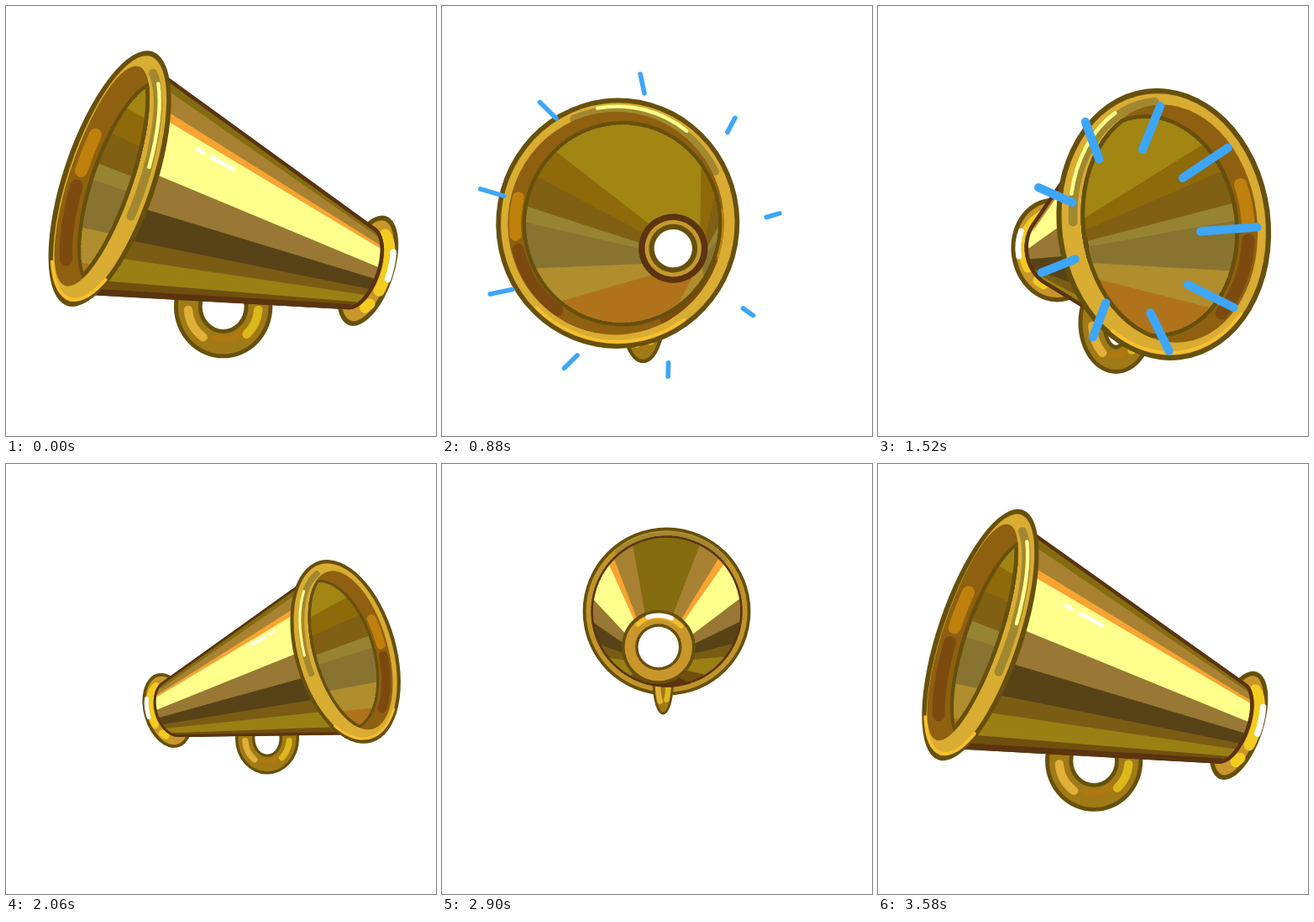
Recreate the animation shown at these times as an HTML page with a canvas. Size 512 px wide and 512 px high, loop 3.6 s.

```html
<!DOCTYPE html>
<html lang="en">
<head>
<meta charset="utf-8">
<title>Golden megaphone</title>
<style>
html, body { margin: 0; height: 100%; overflow: hidden; background: #fff; }
canvas { display: block; width: 512px; height: 512px; }
</style>
</head>
<body>
<canvas id="stage" width="512" height="512"></canvas>
<script>
const ctx = document.getElementById('stage').getContext('2d');
const LOOP = 3600, DEG = Math.PI / 180;
const OUTLINE = '#66500c', EDGE = '#5b3410', GOLD = '#d9ac32', BLUE = '#3ea6f8';

// time, bell x, y, radius, yaw, tilt, mouthpiece x, y, radius
const POSES = [
  [0, 123.5, 205.5, 159.5, -69.8, 18.6, 430.5, 315, 68.5],
  [80, 125, 211, 159.5, -70.2, 18.6, 431, 319, 68.5],
  [300, 93, 228, 145, -55, 16, 383, 306, 60],
  [520, 133.5, 247.5, 129.6, -38, 12, 317, 293.5, 50.5],
  [860, 205, 258, 148, -15, 5, 280, 290, 60],
  [1200, 273, 270, 166.5, 7, 0, 241, 285, 70],
  [1520, 340, 260, 162.5, 38.4, -7.4, 211, 290.5, 62],
  [1680, 383, 242, 169, 43, -10, 215, 300, 63],
  [2060, 404, 223.5, 112.6, 57.5, -16, 192.5, 293.5, 45.7],
  [2260, 462, 208, 106, 84, -17, 206, 284, 42],
  [2580, 390, 170, 100, 135, -12, 222, 240, 42],
  [2900, 268, 175.5, 100, 182, 0, 257.5, 218, 44],
  [3240, 95, 165, 106, 260, 18, 400, 238, 46]
];

// colour bands by angle from the top, mirrored left and right
const OUTSIDE = [
  [27, '#846c10'], [45, '#a88232'], [52, '#f8a432'], [82, '#ffff8c'], [98, '#987834'],
  [118, '#574317'], [130, '#7a5c14'], [150, '#9a8014'], [165, '#70500f'], [181, EDGE]
];
const INSIDE = [
  [48, '#a28614'], [67, '#8f6a0a'], [83, '#806014'], [92, '#978433'],
  [121, '#887430'], [143, '#b08e2e'], [181, '#b0731c']
];

const BURST = { start: 455, length: 240, rays: [10, 9, 8, 8, 9], turn: [9, 0, 0, 0, 16] };

function pose(i) {
  const n = POSES.length, turn = Math.floor(i / n);
  const p = POSES[i - turn * n].slice();
  p[0] += turn * LOOP;
  p[4] += turn * 360;
  return p;
}

// smooth cyclic curve through the poses
function poseAt(t) {
  let i = POSES.length - 1;
  while (POSES[i][0] > t) i--;
  const [a, b, c, d] = [-1, 0, 1, 2].map(o => pose(i + o));
  const h = c[0] - b[0], u = (t - b[0]) / h, u2 = u * u, u3 = u2 * u;
  return b.map((v, j) => {
    const m0 = (c[j] - a[j]) / (c[0] - a[0]) * h;
    const m1 = (d[j] - b[j]) / (d[0] - b[0]) * h;
    return (2 * u3 - 3 * u2 + 1) * v + (u3 - 2 * u2 + u) * m0 +
      (3 * u2 - 2 * u3) * c[j] + (u3 - u2) * m1;
  });
}

const lerp = (a, b, f) => a + (b - a) * f;
const mix = (a, b, f) => ({ x: lerp(a.x, b.x, f), y: lerp(a.y, b.y, f) });

// a round section seen at an angle
function disc(c, r, k, tilt) {
  return { x: c.x, y: c.y, r, k, tilt };
}

function halfway(d, e) {
  const r = (d.r + e.r) / 2;
  return disc(mix(d, e, 0.5), r, (d.r * d.k + e.r * e.k) / 2 / r, d.tilt);
}

function onDisc(d, deg) {
  const s = Math.sin(deg * DEG) * d.k, u = Math.cos(deg * DEG);
  const cs = Math.cos(d.tilt), sn = Math.sin(d.tilt);
  return { x: d.x + d.r * (s * cs + u * sn), y: d.y + d.r * (s * sn - u * cs) };
}

function oval(d, scale, inset = 0, from = 0, to = 360) {
  const r = Math.max(d.r * scale - inset, 0.5);
  ctx.ellipse(d.x, d.y, Math.max(d.r * d.k * scale - inset, 0.5), r, d.tilt,
    (from - 90) * DEG, (to - 90) * DEG);
}

function fillOval(d, scale, color, inset) {
  ctx.beginPath();
  oval(d, scale, inset);
  ctx.fillStyle = color;
  ctx.fill();
}

function clipOval(d, inset) {
  ctx.beginPath();
  oval(d, 1, inset);
  ctx.clip();
}

function arc(d, scale, from, to, width, color) {
  ctx.beginPath();
  oval(d, scale, 0, Math.min(from, to), Math.max(from, to));
  ctx.lineWidth = width;
  ctx.strokeStyle = color;
  ctx.stroke();
}

function line(a, b, width, color) {
  ctx.beginPath();
  ctx.moveTo(a.x, a.y);
  ctx.lineTo(b.x, b.y);
  ctx.lineWidth = width;
  ctx.strokeStyle = color;
  ctx.stroke();
}

// the panels between two sections that wind in the given direction
function panels(wide, narrow, winding, bands, edge) {
  const list = [];
  for (let deg = -180; deg < 180; deg += 3) {
    const p = [onDisc(wide, deg), onDisc(wide, deg + 3), onDisc(narrow, deg + 3), onDisc(narrow, deg)];
    const cross = (p[3].x - p[0].x) * (p[1].y - p[0].y) - (p[3].y - p[0].y) * (p[1].x - p[0].x);
    if (cross * winding <= 0) continue;
    const path = new Path2D();
    p.forEach(q => path.lineTo(q.x, q.y));
    path.closePath();
    list.push([path, bands.find(band => Math.abs(deg + 1.5) < band[0])[1]]);
  }
  if (edge) {
    ctx.lineWidth = edge;
    ctx.strokeStyle = EDGE;
    list.forEach(([path]) => ctx.stroke(path));
  }
  ctx.lineWidth = 1.4;
  for (const [path, color] of list) {
    ctx.fillStyle = ctx.strokeStyle = color;
    ctx.fill(path);
    ctx.stroke(path);
  }
}

function drawHandle(c, h, turn) {
  const w = h * (0.3 + 0.7 * turn), gap = w - 0.55 * h;
  const ring = disc(c, h, w / h, 0);
  const shape = (inset) => {
    ctx.beginPath();
    oval(ring, 1, inset);
    if (gap > 1) {
      ctx.closePath();
      ctx.moveTo(c.x + gap + inset, c.y);
      ctx.ellipse(c.x, c.y, gap + inset, h * 0.44 + inset, 0, 0, 2 * Math.PI);
    }
  };
  shape(0);
  ctx.fillStyle = OUTLINE;
  ctx.fill('evenodd');
  shape(h * 0.08);
  ctx.fillStyle = '#a07a16';
  ctx.fill('evenodd');
  const mid = disc(c, h * 0.72, Math.max((w + Math.max(gap, 0)) / 2, 1) / (h * 0.72), 0);
  arc(mid, 0.88, 140, 195, h * 0.12, '#b0780e');
  arc(mid, 1, 95, 138, h * 0.17, '#dcb81a');
  arc(mid, 1, 215, 265, h * 0.17, '#e0b038');
}

function drawFlange(d, light, back) {
  fillOval(d, 1, OUTLINE);
  fillOval(d, 1, '#c8962a', d.r * 0.085);
  if (back) {
    fillOval(d, 0.63, OUTLINE);
    fillOval(d, 0.55, '#fff');
    arc(d, 0.83, light - 45, light + 45, d.r * 0.12, '#f0c02c');
    arc(d, 0.86, light - 22, light + 22, d.r * 0.12, '#fff');
    return;
  }
  const s = Math.sign(light) || 1;
  arc(d, 0.72, s * 15, s * 112, d.r * 0.19, '#f2cc1e');
  arc(d, 0.72, s * 138, s * 150, d.r * 0.19, '#f2cc1e');
  arc(d, 0.84, s * 58, s * 92, d.r * 0.11, '#fff');
}

function drawMouth(bell, neck, turn, dir, light) {
  const b = bell.r;
  const along = f => ({ x: bell.x + dir.x * b * f, y: bell.y + dir.y * b * f });
  // the lip bulges towards the opening, the throat lies behind it
  const lip = disc(along(0.065), b * (0.9 - 0.04 * turn), bell.k * (1 - 0.25 * turn ** 3), bell.tilt);
  const throat = disc(along(-0.15), b * 0.82, bell.k, bell.tilt);
  const ridge = halfway({ ...bell, r: b * 0.92 }, lip);
  const hollow = halfway(lip, throat);

  fillOval(bell, 1, OUTLINE);
  fillOval(bell, 1, GOLD, b * 0.038);
  arc(bell, 0.945, 140, 220, b * 0.025, '#f8c02c');
  arc(ridge, 1, light - 43, light + 43, b * 0.065, '#a18830');
  arc(ridge, 1.03, light - 30, light + 18, b * 0.028, '#ffff8c');

  ctx.save();
  clipOval(lip);
  fillOval(bell, 1, '#8e6010');
  for (const s of [-1, 1]) {
    const shift = 14 * turn;
    arc(hollow, 1, s * (112 - shift), s * (150 - shift / 2), b * 0.095, '#7c4a0e');
    arc(hollow, 1, s * (84 - shift), s * (104 - shift), b * 0.095, '#c0800c');
  }
  fillOval(throat, 1, OUTLINE);
  clipOval(throat, b * 0.03);
  panels(throat, neck, -1, INSIDE);
  fillOval(neck, 1, EDGE);
  fillOval(neck, 0.82, '#c4982c');
  fillOval(neck, 0.7, OUTLINE);
  fillOval(neck, 0.55, '#fff');
  arc(lip, 1, 0, 360, b * 0.06, OUTLINE);
  ctx.restore();
}

function drawBurst(t, bell, tail) {
  const { start, length, rays, turn } = BURST;
  const i = Math.floor((t - start) / length);
  if (i < 0 || i >= rays.length) return;
  const p = (t - start) / length - i;
  const lag = Math.min(0.27, 1.35 * p * p);
  const near = disc(mix(bell, tail, lag), bell.r * (0.61 + 1.5 * Math.max(0, p - 0.45)),
    bell.k, bell.tilt);
  const far = disc(mix(bell, tail, lag * 0.65), bell.r * (0.66 + 0.35 * p + 0.5 * p * p),
    lerp(bell.k, 1, Math.min(p * 1.2, 0.55)), bell.tilt);
  const width = Math.min(3.2 + 36 * p * p, 10.5, (1 - p) * 25);
  for (let j = 0; j < rays[i]; j++) {
    const deg = turn[i] + j * 360 / rays[i];
    line(onDisc(near, deg), onDisc(far, deg), width, BLUE);
  }
}

function draw(t) {
  const [, bx, by, b, yaw, tiltDeg, sx, sy, r] = poseAt(t);
  const tilt = tiltDeg * DEG;
  const sin = Math.sin(yaw * DEG), cos = Math.cos(yaw * DEG);
  const turn = Math.abs(sin), flat = Math.abs(cos), front = cos > 0;
  const bellPos = { x: bx, y: by }, tailPos = { x: sx, y: sy };
  const tailFlat = Math.min(1, flat * 0.9 + 0.14);
  const bell = disc(bellPos, b, Math.max(flat, 0.1), tilt);
  const base = disc(bellPos, b * 0.87, flat, tilt);
  const neck = disc(mix(tailPos, bellPos, 0.035), r * 0.68, tailFlat, tilt);
  const flange = disc(tailPos, r, tailFlat, tilt);
  const light = -65 * sin;
  const dir = { x: sin * Math.cos(tilt), y: sin * Math.sin(tilt) };

  ctx.fillStyle = '#fff';
  ctx.fillRect(0, 0, 512, 512);
  ctx.lineCap = 'round';
  ctx.lineJoin = 'round';

  if (front) {
    drawFlange(flange, light, false);
  } else {
    fillOval(bell, 1, OUTLINE);
    fillOval(bell, 1, '#c09428', b * 0.038);
    arc(bell, 0.92, light - 42, light + 46, b * 0.06, '#a18830');
    arc(bell, 0.89, light - 28, light + 28, b * 0.025, '#ffff8c');
  }

  const girth = b * 0.86 * 0.56 + r * 0.68 * 0.44;
  const grip = mix(bellPos, tailPos, 0.44);
  drawHandle({ x: grip.x, y: grip.y + girth * 1.07 }, girth * 0.63, turn);

  panels(base, neck, front ? 1 : -1, OUTSIDE, b * 0.065);
  if (turn > 0.5) {
    const deg = (sin < 0 ? 1 : -1) * 57;
    const from = onDisc(base, deg), to = onDisc(neck, deg);
    const w = b * 0.03;
    line(mix(from, to, 0.165), mix(from, to, 0.19), w, '#fff');
    line(mix(from, to, 0.23), mix(from, to, 0.325), w, '#fff');
  }

  if (front) drawMouth(bell, neck, turn, dir, light);
  else drawFlange(flange, light, true);

  drawBurst(t, bell, tailPos);
}

const began = performance.now();
function tick() {
  draw((performance.now() - began) % LOOP);
  requestAnimationFrame(tick);
}
tick();
</script>
</body>
</html>
```
